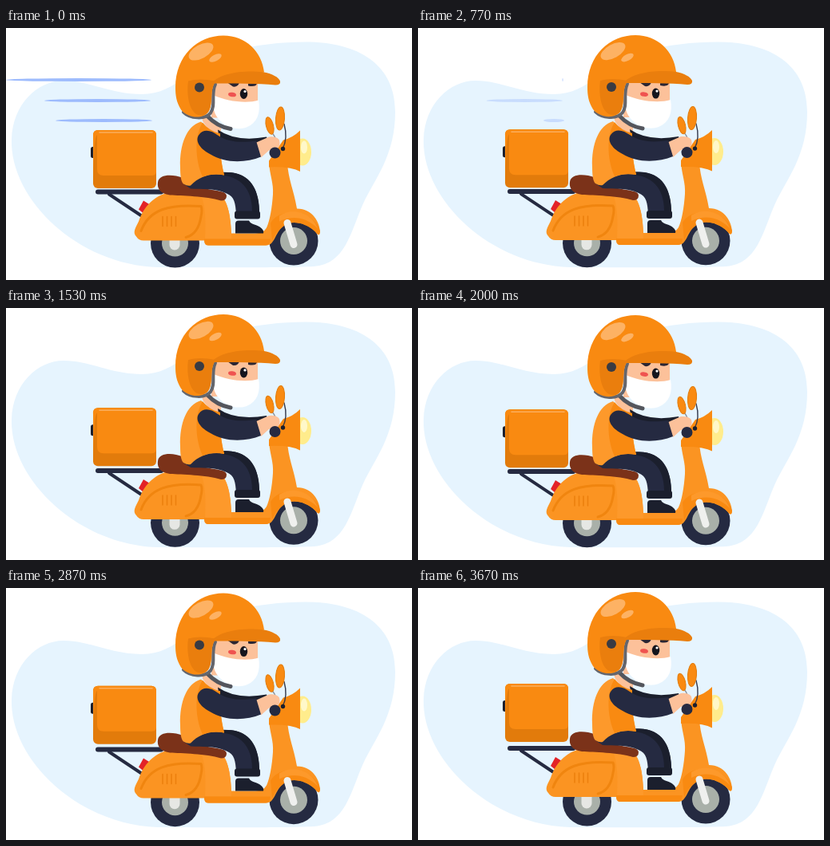
These frames come from a looping animation (508 by 316 pixels, 3830 ms). An HTML page:

```html
<!DOCTYPE html>
<html lang="en">
<head>
<meta charset="utf-8">
<title>Scooter delivery</title>
<style>
  html, body { margin: 0; width: 100%; height: 100%; overflow: hidden; background: #fff; }
  svg { display: block; width: 100vw; height: 100vh; }
  .main { fill: #f98a11; }
  .mid { fill: #fb9422; }
  .light { fill: #fd992b; }
  .shade { fill: #e27b0b; }
  .navy { fill: #252a41; }
  .dark { fill: #1b1f2d; }
  .skin { fill: #fcc19a; }
  .line { fill: none; stroke-linecap: round; stroke-linejoin: round; }
</style>
</head>
<body>
<svg viewBox="0 0 508 316">
  <path fill="#e6f4fe" d="M7 140C8 95 40 66 72 66C105 66 130 83 170 83C215 83 230 45 280 30C310 21 345 17.500 375 17.500C440 17.500 487 45 487 105C487 160 462 188 447 220C431 256 425 296 385 299C350 301 230 300 190 300C90 297 5 215 7 140Z"/>
  <g id="wind" fill="#9dbbfd"></g>

  <g data-drop="4.5" class="line" stroke="#252a41">
    <path stroke-width="6" d="M115 201H194"/>
    <path stroke-width="4" d="M129 204L171 232"/>
  </g>

  <g data-drop="8">
    <rect class="dark" x="106" y="141" width="7" height="14" rx="2.5"/>
    <rect class="shade" x="109" y="120" width="79" height="73" rx="6"/>
    <path class="main" d="M109 180V126Q109 120 115 120H182Q188 120 188 126V172Q188 177 182 177H122Q114 177 114 169V126Q110 128 109 180Z"/>
    <path class="line" stroke="#fcae5c" stroke-width="1.6" d="M117 123H183"/>
  </g>

  <g data-drop="2">
    <circle class="navy" cx="211.5" cy="268" r="30.5"/>
    <circle fill="#a9b0a9" cx="211.5" cy="268" r="16.5"/>
    <path class="line" stroke="#e6e7e4" stroke-width="13" d="M211 256V270"/>
    <circle class="navy" cx="360" cy="265" r="30.5"/>
    <circle fill="#a9b0a9" cx="360" cy="265" r="17"/>
  </g>

  <g data-drop="4.5">
    <!-- scooter -->
    <path fill="#e32227" d="M172 212L180 217L172 228L166 223Z"/>
    <path class="mid" d="M163 257C158 252 162 246 166 238C172 220 185 206 203 202H262C277 206 281 230 282 253H312Q322 253 326 246C330 238 333 220 334 204C335 190 330 180 329 164H352C353 185 360 198 364 222C384 222 393 240 393 252Q392 258 387 251C374 238 354 236 346 245C337 252 336 268 326 268H253Q248 268 248 262H172Q166 262 163 257Z"/>
    <path class="light" d="M244 205L266 203C278 210 282 234 282 260H249C250 238 250 220 244 205Z"/>
    <path class="line" stroke="#f0850f" stroke-width="3" d="M169 250C179 223 204 216 244 219Q246 223 244 232C242 245 237 255 225 258"/>
    <path class="line" stroke="#ec7f0d" stroke-width="1.500" d="M196 232V244M201.500 232V244M207 232V244M212.500 232V244"/>
    <path class="main" d="M248 260H331Q330 268 325 268H253Q248 268 248 260Z"/>
    <path class="main" d="M331 240C342 220 384 222 393 250Q392 258 387 251C374 238 354 236 346 245Q338 250 333 262Z"/>
    <path class="light" d="M342 231C360 219 384 229 390 247C374 231 357 231 342 238Z"/>
    <path class="line" stroke="#eff0ee" stroke-width="9" d="M352 240L360 267"/>
    <path fill="#7b3219" d="M190 189C191 180 203 179 213 181C226 184 238 192 250 197C264 200 276 200 276 206Q276 212 269 212C250 206 220 206 205 205C192 203 189 196 190 189Z"/>

    <!-- rider body -->
    <path class="skin" d="M245 103L270 117L268 129Q255 128 246 112Z"/>
    <path class="dark" d="M265 123Q288 139 326 132L330 143L268 142Z"/>
    <path class="navy" d="M222 191C240 179 264 174 284 177C308 181 317 200 317 229H288C287 215 286 207 276 203C262 196 244 198 231 197Z"/>
    <path class="dark" d="M270 177C303 173 318 197 317 229H308C309 202 298 183 270 180Z"/>
    <rect class="dark" x="286" y="225" width="32" height="10" rx="3"/>
    <path class="dark" d="M287 241Q287 237 291 237H304C307 243 314 241 320 247Q323 250 322 253H287Z"/>
    <path class="light" d="M244 113C226 118 217 142 218 170C218 181 219 188 222 191Q227 194 231 193C242 181 258 177 273 180C269 163 267 148 268 128Q255 125 244 113Z"/>
    <path class="main" d="M246 114Q255 126 268 128C267 148 269 163 273 180Q258 177 246 182C236 160 236 130 246 114Z"/>

    <!-- front end -->
    <ellipse fill="#ffec8c" cx="371" cy="151" rx="11" ry="17"/>
    <ellipse fill="#fff8c9" cx="373" cy="145" rx="4" ry="8"/>
    <path class="main" d="M329 162L347 136Q359 133 368 124V175.500Q357 169 329 170Z"/>
    <path class="line" stroke="#8b9199" stroke-width="1.400" d="M333 127Q339 134 339 145"/>
    <path class="line" stroke="#33384a" stroke-width="1.400" d="M348 116Q353 134 346 147"/>
    <g class="main" stroke="#e27b0b">
      <ellipse cx="343" cy="109" rx="5.500" ry="14.500" transform="rotate(4 343 109)"/>
      <ellipse cx="330" cy="118" rx="4.500" ry="11" transform="rotate(-14 330 118)"/>
    </g>
    <circle class="dark" cx="346.500" cy="147" r="2.700"/>
    <path class="skin" d="M311 140L329 132Q338 131 342 136Q344 144 339 146L329 149L319 158Z"/>
    <circle class="navy" cx="336.500" cy="152" r="7"/>
    <path class="navy" d="M241 130C247 121 257 124 265 130C280 140 296 139 313 137L319 157C300 165 273 165 256 154C244 148 236 138 241 130Z"/>

    <!-- head -->
    <path class="skin" d="M257 60H315V91L300 108H257Z"/>
    <path fill="#2b2633" d="M277 64H292Q290 70 284 69ZM303 65H314Q313 70 303 68Z"/>
    <ellipse fill="#ef5350" cx="283" cy="79" rx="5" ry="2.700" transform="rotate(8 283 79)"/>
    <ellipse fill="#15151d" cx="297.500" cy="78" rx="4.700" ry="6.500"/>
    <circle fill="#fff" cx="299" cy="75" r="1.600"/>
    <path fill="#fff" d="M260 80C276 87 300 91 316 86C319 102 314 115 301 120C285 126 264 115 260 98Z"/>
    <path class="line" stroke="#54565d" stroke-width="5" d="M252 106Q264 119 281 122"/>
    <path class="line" stroke="#64666d" stroke-width="4" d="M262 66C256 78 263 92 256 102C249 111 230 109 222 101"/>
    <path class="main" d="M212 70C212 30 240 5 272 5C300 5 320 25 323 51L262 63C254 74 260 91 253 101C246 110 228 109 219 98C213 88 212 80 212 70Z"/>
    <path fill="#ea7e0d" d="M228 62Q242 58 262 62C254 74 260 91 253 101Q248 107 239 104C228 98 226 76 228 62Z"/>
    <path fill="#ea7e0d" d="M257 65C268 51 300 48 323 51C333 53 341 57 343 62Q344 67 337 67C315 65 285 65 257 65Z"/>
    <g fill="#fdb264">
      <ellipse cx="244" cy="25" rx="17" ry="8.500" transform="rotate(-29 244 25)"/>
      <ellipse cx="262" cy="33" rx="8.500" ry="4" transform="rotate(-28 262 33)"/>
    </g>
    <circle fill="#393b43" cx="242" cy="70" r="6"/>
  </g>
</svg>
<script>
  const LOOP = 3830;
  // Alternating lowest and highest points of the ride, in ms.
  const turns = [20, 355, 700, 1060, 1400, 1730, 2070, 2390, 2690, 2990, 3320, 3670];
  const streaks = [
    { left: 0, right: 182, y: 65, start: 0, span: 830 },
    { left: 48, right: 181, y: 91, start: 400, span: 990 },
    { left: 62, right: 183, y: 116, start: 300, span: 700 }
  ];

  const clamp = v => Math.min(1, Math.max(0, v));
  const ease = u => u < 0.5 ? 2 * u * u : 1 - 2 * (1 - u) ** 2;
  const parts = [...document.querySelectorAll('[data-drop]')];
  const wind = document.getElementById('wind');
  for (const s of streaks) {
    s.node = wind.appendChild(document.createElementNS('http://www.w3.org/2000/svg', 'ellipse'));
    s.node.setAttribute('cy', s.y);
    s.node.setAttribute('ry', 2);
  }

  // 1 at the lowest point, 0 at the highest.
  function sag(t) {
    const next = turns.findIndex(v => v > t);
    if (next === 0) return 1;
    if (next < 0) return 0;
    const u = (t - turns[next - 1]) / (turns[next] - turns[next - 1]);
    const wave = (1 + Math.cos(Math.PI * u)) / 2;
    return next % 2 ? wave : 1 - wave;
  }

  function draw(now) {
    const t = now % LOOP, low = sag(t);
    for (const part of parts) {
      part.setAttribute('transform', `translate(0 ${part.dataset.drop * low})`);
    }
    wind.setAttribute('opacity', clamp(1 - t / 1300));
    for (const { left, right, start, span, node } of streaks) {
      const x = left + (right - left) * ease(clamp((t - start) / span));
      node.setAttribute('cx', (x + right) / 2);
      node.setAttribute('rx', (right - x) / 2);
    }
    requestAnimationFrame(() => draw(performance.now()));
  }
  draw(0);
</script>
</body>
</html>
```
